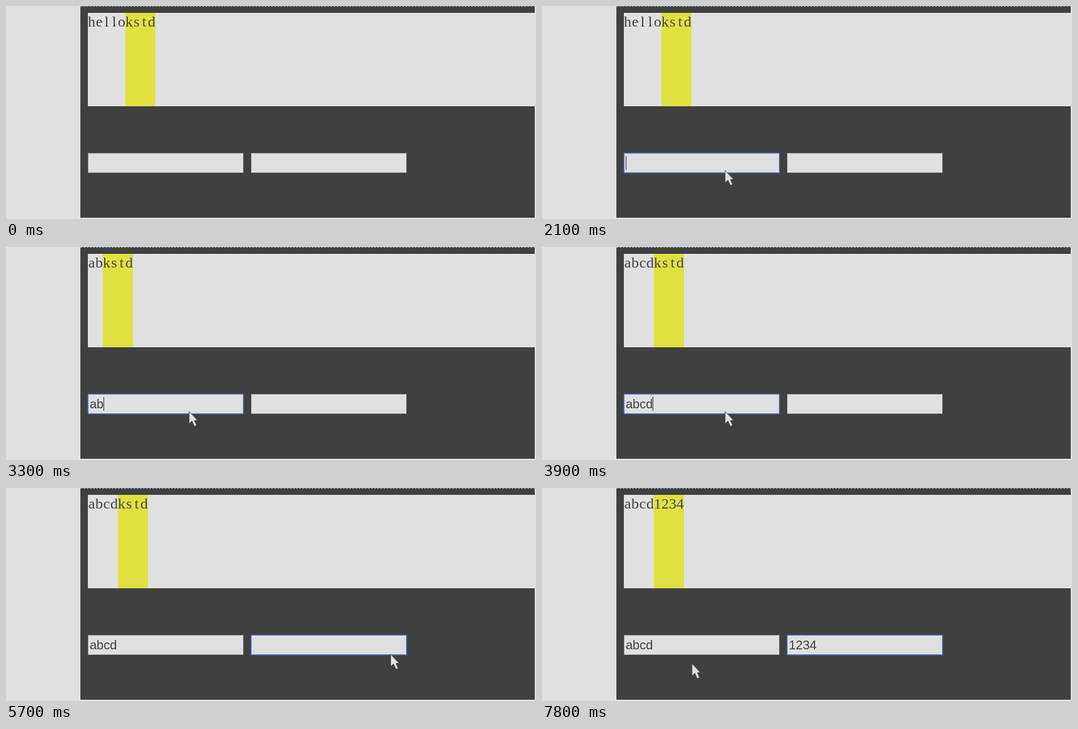
Animation of 848x342 px, one loop 8000 ms. Source, as an HTML page:

```html
<!DOCTYPE html>
<html lang="en">
<head>
<meta charset="utf-8">
<title>Bound inputs</title>
<style>
  html, body { margin: 0; width: 100%; height: 100%; overflow: hidden; background: #e0e0e0; }
  svg { display: block; width: 100%; height: 100%; }
  text { fill: #404040; white-space: pre; }
  #out text { font: 24px "Liberation Serif", "Times New Roman", serif; text-anchor: middle; }
  #tail { fill: #404850; }
  .field text { font: 20px "Liberation Sans", Arial, sans-serif; }
  .box { fill: #e0e0e0; stroke: #a0a0a0; }
  .glow { fill: none; stroke: #4080c0; stroke-opacity: .5; visibility: hidden; }
  .on .box { stroke: #6078d0; }
  .on .glow { visibility: visible; }
  .caret { fill: #303030; }
</style>
</head>
<body>
<svg viewBox="0 0 848 342" preserveAspectRatio="none">
  <rect width="848" height="342" fill="#e0e0e0"/>
  <rect x="119" width="727" height="340" fill="#404040"/>
  <path d="M119 .5H848" stroke="#80c0e0" stroke-dasharray="3 2"/>
  <g id="out">
    <rect x="131" y="11" width="717" height="150" fill="#e0e0e0"/>
    <rect id="mark" y="11" height="150" fill="#e0e040"/>
    <text id="head" y="33"></text>
    <text id="tail" y="33"></text>
  </g>
  <g class="field" transform="translate(131 236)">
    <rect class="glow" x="-.5" y="-.5" width="250" height="33" rx="1"/>
    <rect class="box" x=".5" y=".5" width="248" height="31"/>
    <text x="3" y="23"></text>
    <rect class="caret" y="5" width="1" height="22"/>
  </g>
  <g class="field" transform="translate(392 236)">
    <rect class="glow" x="-.5" y="-.5" width="250" height="33" rx="1"/>
    <rect class="box" x=".5" y=".5" width="248" height="31"/>
    <text x="3" y="23"></text>
    <rect class="caret" y="5" width="1" height="22"/>
  </g>
  <path id="pointer" d="M0 0V19.5L4.5 15.5L8.5 24L12 22.5L8.5 14.5H13.5Z" fill="#e0e0e0" stroke="#404040" stroke-width=".8"/>
</svg>
<script>
const LOOP = 8000, CELL = 12, LEFT = 131;
const $ = id => document.getElementById(id);
const fields = [...document.querySelectorAll('.field')];

// Each step keeps whatever it does not change.
const steps = [
  { t: 0, at: null, values: ['', ''], focus: -1, caret: false },
  { t: 300, at: [336, 289] },
  { t: 600, at: [306, 275] },
  { t: 900, at: [293, 264] },
  { t: 1200, focus: 0, caret: true },
  { t: 1800, caret: false },
  { t: 2100, caret: true },
  { t: 2400, caret: false },
  { t: 2700, caret: true },
  { t: 3000, values: ['a', ''] },
  { t: 3300, values: ['ab', ''] },
  { t: 3600, values: ['abc', ''] },
  { t: 3900, values: ['abcd', ''] },
  { t: 4200, caret: false },
  { t: 4500, at: [352, 262], caret: true },
  { t: 4800, at: [505, 260] },
  { t: 5100, at: [604, 264], caret: false },
  { t: 5400, at: [615.5, 267], focus: 1, caret: true },
  { t: 5700, caret: false },
  { t: 6000, values: ['abcd', '1'], caret: true },
  { t: 6300, values: ['abcd', '12'] },
  { t: 6600, values: ['abcd', '123'] },
  { t: 6900, values: ['abcd', '1234'] },
  { t: 7200, at: [572, 290], caret: false },
  { t: 7500, at: [390, 297], caret: true },
  { t: 7800, at: [240, 282], caret: false }
];
for (let i = 1; i < steps.length; i++) steps[i] = { ...steps[i - 1], ...steps[i] };

// Centres every letter in its own cell of the grid.
function setCells(el, str, x) {
  el.setAttribute('x', [...str].map((c, i) => x + CELL * (i + .5)).join(' '));
  el.textContent = str;
}

function render({ at, values, focus, caret }) {
  const head = values[0] || 'hello', tail = values[1] || 'kstd';
  const split = LEFT + CELL * head.length;
  setCells($('head'), head, LEFT);
  setCells($('tail'), tail, split);
  $('mark').setAttribute('x', split);
  $('mark').setAttribute('width', CELL * tail.length);

  fields.forEach((field, i) => {
    const text = field.querySelector('text');
    const bar = field.querySelector('.caret');
    field.classList.toggle('on', i === focus);
    text.textContent = values[i];
    bar.setAttribute('x', 3 + Math.floor(values[i] ? text.getComputedTextLength() : 0));
    bar.style.visibility = i === focus && caret ? 'visible' : 'hidden';
  });

  $('pointer').style.visibility = at ? 'visible' : 'hidden';
  if (at) $('pointer').setAttribute('transform', `translate(${at})`);
}

const start = performance.now();
let shown;
function tick(now) {
  const t = Math.max(0, now - start) % LOOP;
  const step = steps.filter(s => s.t <= t).pop();
  if (step !== shown) render(shown = step);
  requestAnimationFrame(tick);
}
tick(start);
</script>
</body>
</html>
```
